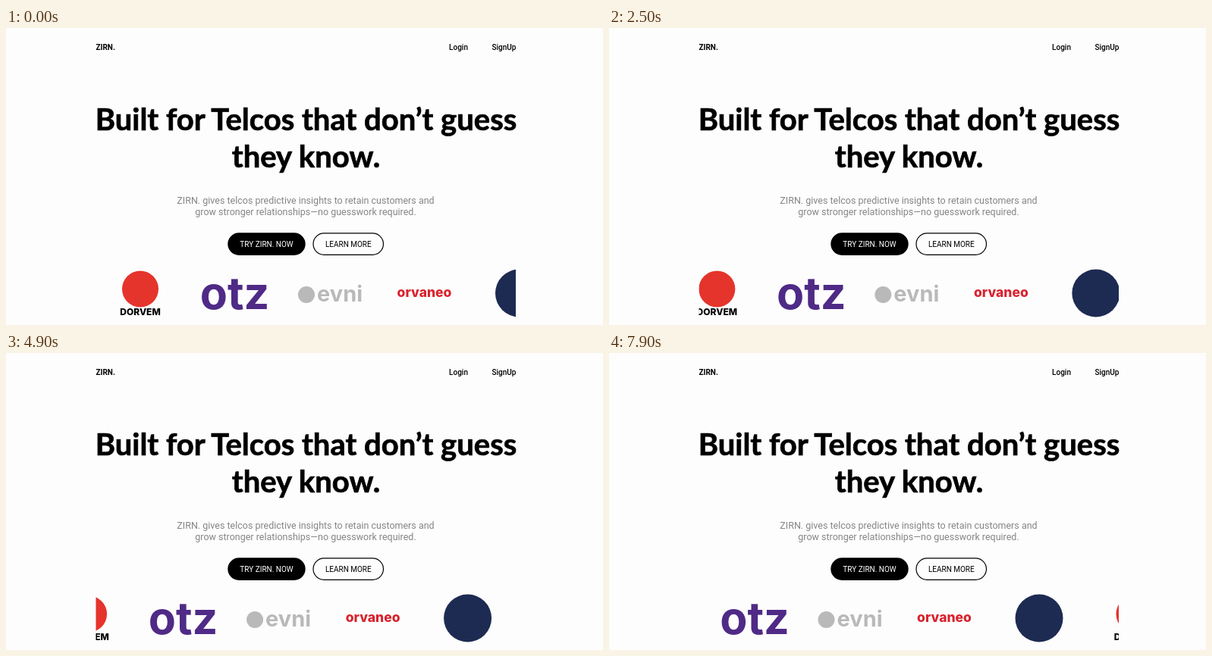
These frames come from a looping animation (787 px wide and 392 px high, 8000 ms). An HTML page:

```html
<!DOCTYPE html>
<html lang="en">
<head>
<meta charset="utf-8">
<title>Hero with partner strip</title>
<style>
  html, body { margin: 0; width: 100%; height: 100%; overflow: hidden; background: #fdfdfd; }
  svg { display: block; width: 100%; height: 100%; }
  text { font-family: Roboto, sans-serif; font-size: 10px; }
  .mid { text-anchor: middle; }
  .end { text-anchor: end; font-weight: 500; }
  .headline { font: 700 40px Lato, sans-serif; stroke: #000; stroke-width: .7; }
  .lead { font-size: 12.5px; fill: #858585; }
  .brand { font-family: Inter, sans-serif; font-weight: 700; }
</style>
</head>
<body>
<svg viewBox="0 0 787 392">
  <defs>
    <clipPath id="strip"><rect x="118.5" y="310" width="553.5" height="82"/></clipPath>
    <g id="partners">
      <circle cx="177" cy="344.5" r="24" fill="#e5342b"/>
      <text class="brand mid" x="177" y="379" style="font-size:12px;font-weight:800">DORVEM</text>
      <text class="brand mid" x="301.5" y="371" fill="#4f2a86" style="font-size:59px">otz</text>
      <circle cx="396" cy="352" r="11" fill="#b9b9b9"/>
      <text class="brand" x="410" y="361" fill="#b9b9b9" style="font-size:29px">evni</text>
      <text class="brand mid" x="551.5" y="355" fill="#d8232e" style="font-size:17.5px;font-weight:800">orvaneo</text>
      <circle cx="676.5" cy="350" r="31.5" fill="#1d2b52"/>
    </g>
  </defs>

  <text x="118.5" y="29" font-weight="700">ZIRN.</text>
  <text class="end" x="609" y="29">Login</text>
  <text class="end" x="672.5" y="29">SignUp</text>

  <text class="headline mid" x="395.5" y="135">Built for Telcos that don’t guess</text>
  <text class="headline mid" x="395.5" y="184">they know.</text>

  <text class="lead mid" x="395" y="231.5">ZIRN. gives telcos predictive insights to retain customers and</text>
  <text class="lead mid" x="395" y="247.3">grow stronger relationships—no guesswork required.</text>

  <rect x="292.3" y="270.3" width="102.4" height="29.6" rx="14.8"/>
  <text class="mid" x="343.5" y="289" fill="#fff">TRY ZIRN. NOW</text>
  <rect x="405" y="270.9" width="92.5" height="28.4" rx="14.2" fill="none" stroke="#000" stroke-width="1.2"/>
  <text class="mid" x="451.3" y="289">LEARN MORE</text>

  <g clip-path="url(#strip)">
    <g id="track">
      <use href="#partners"/>
      <use href="#partners" x="625"/>
    </g>
  </g>
</svg>
<script>
  const LOOP = 8000;
  const STEP = 100;
  const SPEED = 13.86; // px per second
  const track = document.getElementById('track');
  const start = performance.now();

  function draw(ms) {
    const time = Math.floor((ms % LOOP) / STEP) * STEP;
    track.setAttribute('transform', `translate(${-SPEED * time / 1000} 0)`);
  }

  function tick() {
    draw(performance.now() - start);
    requestAnimationFrame(tick);
  }
  tick();
</script>
</body>
</html>
```
